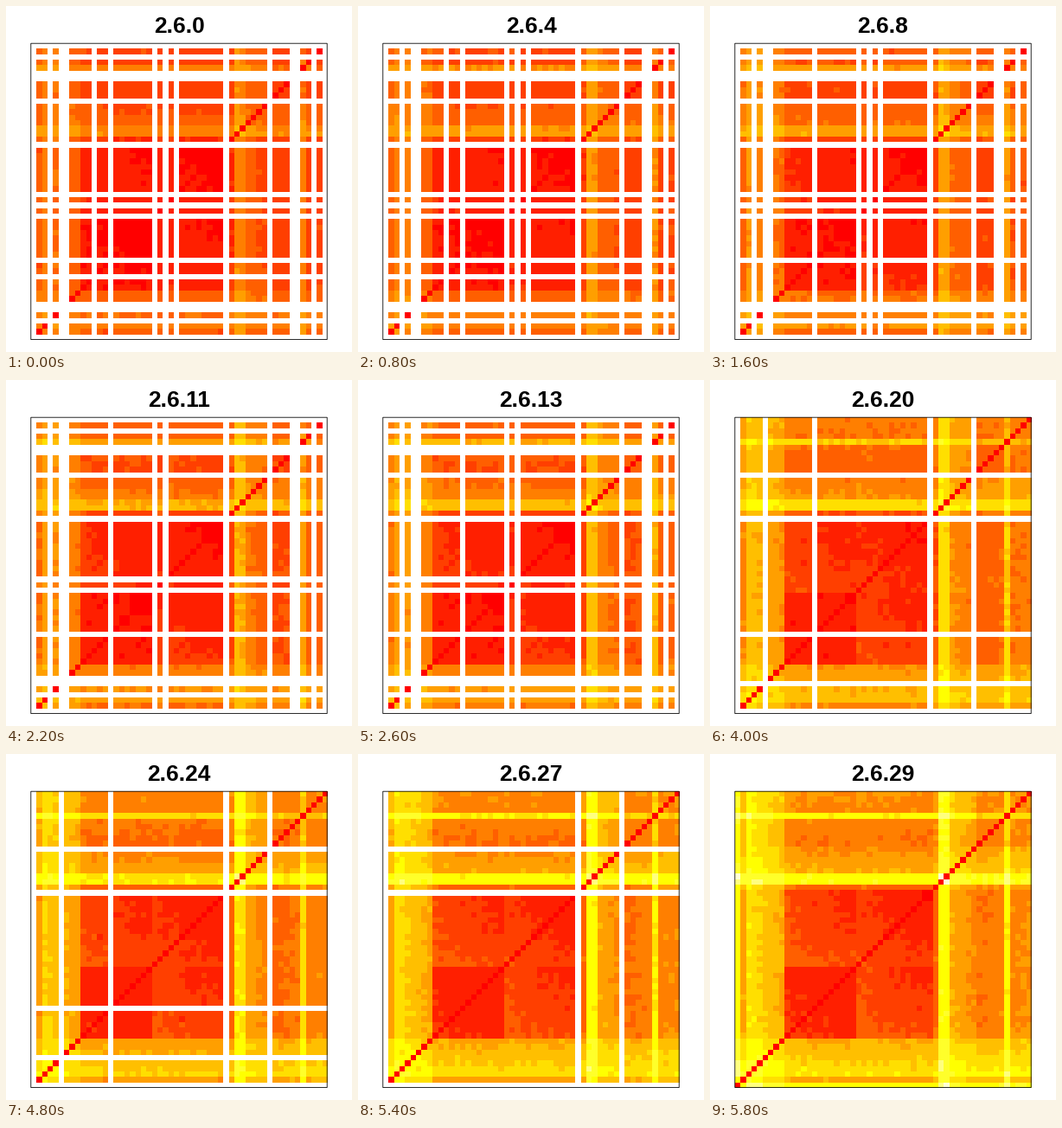
Write a matplotlib script that moves like this. It is 400 by 400 pixels and loops after 8000 ms.

```python
import colorsys

import matplotlib.pyplot as plt
import numpy as np
from matplotlib.animation import FuncAnimation
from matplotlib.colors import ListedColormap
from matplotlib.patches import Rectangle

SIZE, DPI = 400, 100
STEP, LOOP = 200, 8000
LAST = 29
LEFT, TOP, SIDE = 28.8, 43.2, 342.4
POWER = 3

# Families along the diagonal: size, first and last distance from the
# common core, and how much closer members are to each other
FAMILIES = [(9, 8.4, 5.8, 1), (13, 2.9, 1.5, .6), (14, 2.8, .7, .85),
            (1, 3.5, 3.5, 1), (2, 8.7, 8.5, 1), (5, 6, 4.7, 1),
            (10, 3.9, 5, .85)]

# Items that first appear in a later release
ARRIVALS = {5: [11], 11: [26], 14: [3, 22], 16: [24, 48],
            19: [6, 47, 51, 53], 27: [5, 14], 29: [0, 35, 43]}

spread = np.concatenate([np.linspace(a, b, n) for n, a, b, _ in FAMILIES])
spread[1], spread[49] = 5.6, 8.2
count = len(spread)

closeness = np.ones((count, count))
start = 0
for n, _, _, factor in FAMILIES:
    closeness[start:start + n, start:start + n] = factor
    start += n

born = np.zeros(count, int)
for release, items in ARRIVALS.items():
    born[items] = release

rng = np.random.default_rng(26)
jitter = np.triu(rng.normal(0, .2, (count, count)), 1)
jitter += jitter.T


def heat_colors():
    """Twelve steps from red through yellow to near white."""
    warm = [colorsys.hsv_to_rgb(h, 1, 1) for h in np.linspace(0, 1 / 6, 9)]
    pale = [colorsys.hsv_to_rgb(1 / 6, s, 1) for s in (5 / 6, 1 / 2, 1 / 6)]
    return ListedColormap(warm + pale)


def levels(release):
    growth = .55 + .45 * (release / LAST) ** 1.15
    r = (spread * growth) ** POWER
    dist = (r[:, None] + r[None, :]) ** (1 / POWER)
    dist = dist * closeness + jitter * growth
    np.fill_diagonal(dist, 0)
    grid = np.clip(np.floor(dist), 0, 11) + .5
    absent = born > release
    return np.ma.array(grid, mask=absent[:, None] | absent[None, :])


fig = plt.figure(figsize=(SIZE / DPI, SIZE / DPI), dpi=DPI, facecolor="white")
ax = fig.add_axes([0, 0, 1, 1])
cmap = heat_colors()
cmap.set_bad("white")
image = ax.imshow(levels(0), cmap=cmap, vmin=0, vmax=12, origin="lower",
                  extent=(LEFT, LEFT + SIDE, TOP + SIDE, TOP), aspect="auto",
                  interpolation="nearest")
ax.set_xlim(0, SIZE)
ax.set_ylim(SIZE, 0)
ax.axis("off")
ax.add_patch(Rectangle((LEFT, TOP), SIDE, SIDE, fill=False, snap=False,
                       edgecolor="black", linewidth=.6))
title = ax.text(200, 30.6, "", ha="center", va="baseline", color="black",
                family="Liberation Sans", weight="bold", size=26.4 * .72)


def update(frame):
    release = min(frame, LAST)
    image.set_data(levels(release))
    title.set_text(f"2.6.{release}")
    return image, title


anim = FuncAnimation(fig, update, frames=LOOP // STEP, interval=STEP,
                     repeat=True, repeat_delay=0)
plt.show()
```
